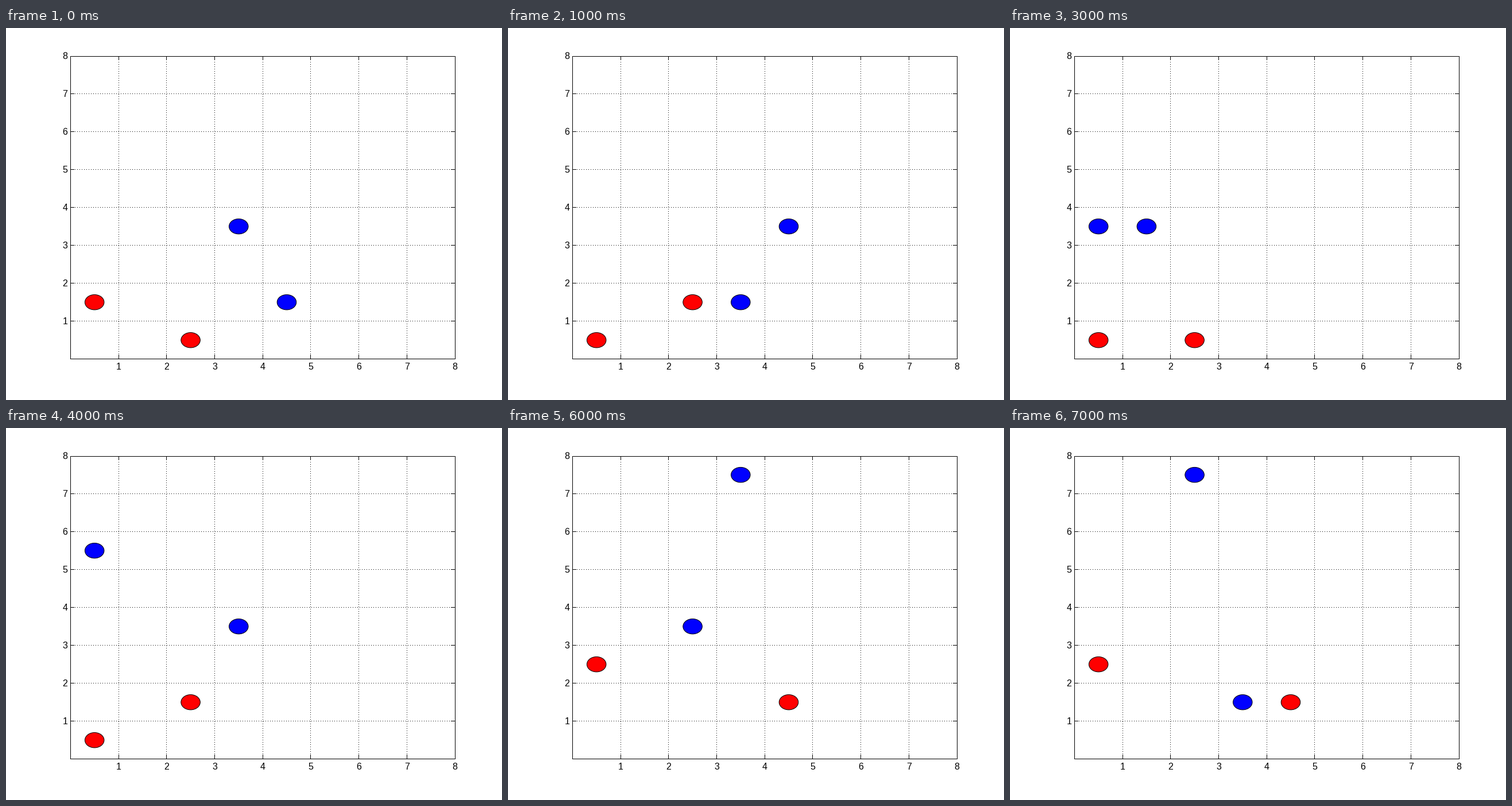
These frames come from a looping animation (864x648 px, 8000 ms). A matplotlib script:

```python
import math

import matplotlib.pyplot as plt
from matplotlib.animation import FuncAnimation
from matplotlib.patches import Ellipse

W, H, DPI = 864, 648, 100
CELLS = 8
LEFT, BOTTOM = 0.13 * W, 0.89 * H
CELL_W, CELL_H = 0.775 * W / CELLS, 0.815 * H / CELLS
PX = 72 / DPI  # one pixel in points
TICK = 7
COMPASS = {"N": (0, 1), "S": (0, -1), "E": (1, 0), "W": (-1, 0), "-": (0, 0)}

# Color, cells per step, start cell, and one word of steps per second.
WALKERS = [
    ("red", 1, (0, 1), "S - - - N N -"),
    ("red", 1, (2, 0), "N S - N E E -"),
    ("blue", 2, (3, 3), "S W N E E WNN SSS"),
    ("blue", 2, (4, 1), "N W W N E S NN"),
]

fig = plt.figure(figsize=(W / DPI, H / DPI), dpi=DPI, facecolor="white")
ax = fig.add_axes([0, 0, 1, 1])
ax.set_xlim(0, W)
ax.set_ylim(H, 0)
ax.axis("off")


def to_px(x, y):
    return LEFT + x * CELL_W, BOTTOM - y * CELL_H


def walk(start, step, words):
    """Cells visited, one per second."""
    x, y = start
    cells = [start]
    for word in words.split():
        for letter in word:
            dx, dy = COMPASS[letter]
            x, y = x + step * dx, y + step * dy
        cells.append((x, y))
    return cells


def line(x0, y0, x1, y1, style="-"):
    ax.plot([x0, x1], [y0, y1], color="black", lw=PX, ls=style, snap=False,
            solid_capstyle="butt", dash_capstyle="butt", zorder=1)


def label(x, y, value):
    ax.text(x, y, str(value), family="Liberation Sans", size=16 * PX,
            color="black", ha="center", va="baseline")


def draw_grid():
    x0, y0 = (math.floor(v) for v in to_px(0, 0))
    x1, y1 = (math.ceil(v) for v in to_px(CELLS, CELLS))
    dots = (0, (1, 3))
    for k in range(1, CELLS + 1):
        px, py = to_px(k, k)
        gx, gy = math.floor(px) + 0.5, math.floor(py) + 0.5
        if k < CELLS:
            line(gx, y0, gx, y1, dots)
            line(x0, gy, x1, gy, dots)
            line(gx, y0, gx, y0 - TICK)
            line(gx, y1, gx, y1 + TICK)
            line(x0, gy, x0 + TICK, gy)
            line(x1, gy, x1 - TICK, gy)
        label(px, 595, k)
        label(103, gy + 5.5, k)
    for y in (y0, y1):
        line(x0, y + 0.5, x1 + 1, y + 0.5)
    for x in (x0, x1):
        line(x + 0.5, y0 + 1, x + 0.5, y1)


def make_disc(color):
    disc = Ellipse((0, 0), 0.4 * CELL_W, 0.4 * CELL_H, facecolor=color,
                   edgecolor="black", lw=PX, zorder=3)
    return ax.add_patch(disc)


draw_grid()
discs = [make_disc(color) for color, *_ in WALKERS]
paths = [walk(start, step, words) for _, step, start, words in WALKERS]


def update(i):
    for disc, path in zip(discs, paths):
        col, row = path[i]
        disc.set_center(to_px(col + 0.5, row + 0.5))
    return discs


anim = FuncAnimation(fig, update, frames=len(paths[0]), interval=1000,
                     repeat=True, repeat_delay=0, blit=False)
plt.show()
```
